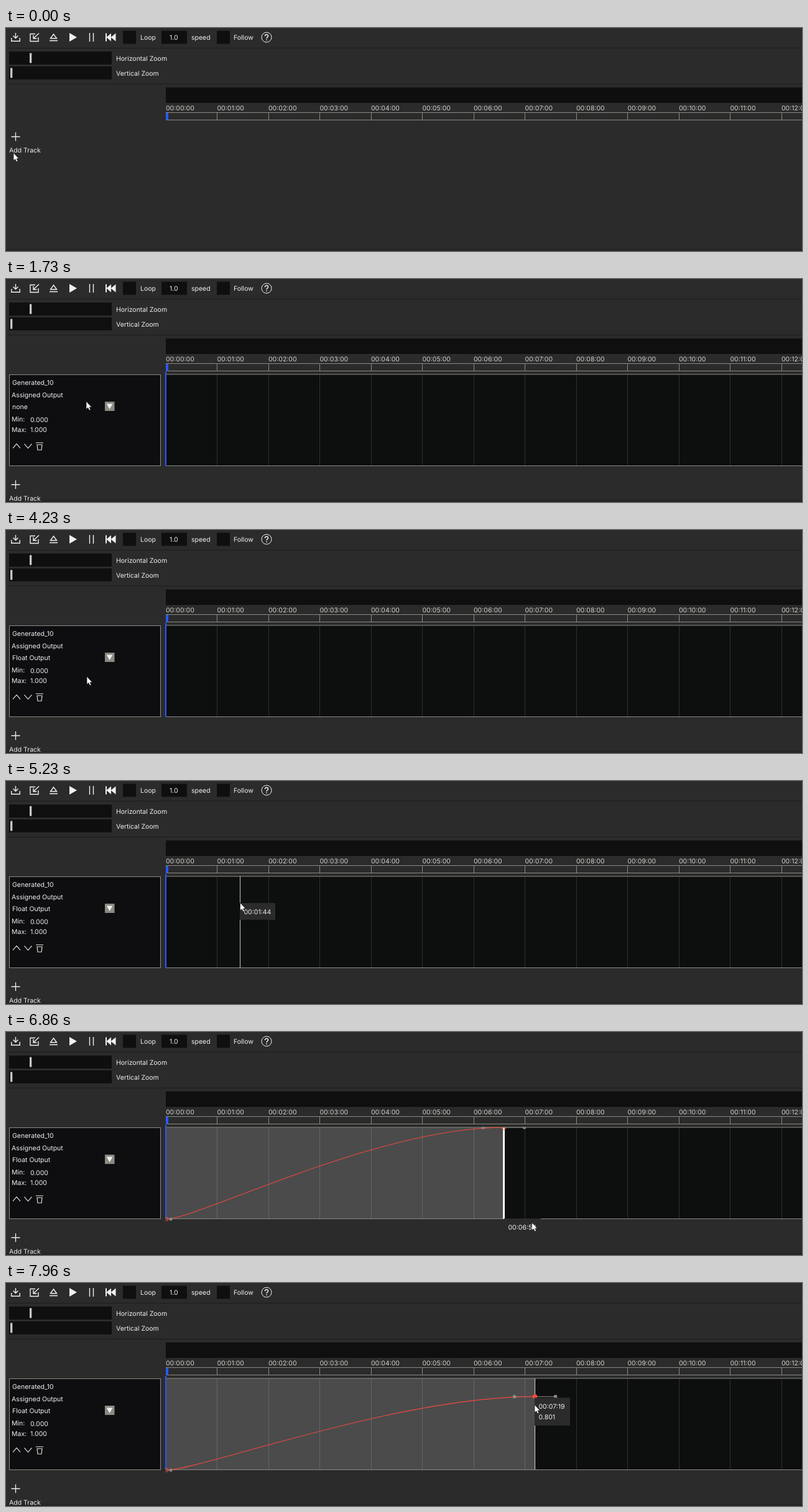
These frames come from a looping animation (1280 by 360 pixels, 8000 ms). An HTML page:

```html
<!DOCTYPE html>
<html lang="en">
<head>
<meta charset="utf-8">
<title>Sequence editor</title>
<style>
html, body { margin: 0; width: 100%; height: 100%; overflow: hidden; background: #2b2b2b; }
svg { display: block; width: 1280px; height: 360px; }
text { font: 10.5px Inter, "Open Sans", sans-serif; white-space: pre; text-rendering: geometricPrecision; }
</style>
</head>
<body>
<svg id="stage" viewBox="0 0 1280 360" xmlns="http://www.w3.org/2000/svg">
  <defs>
    <clipPath id="trackClip"><rect x="256" y="153.5" width="1024" height="160"/></clipPath>
  </defs>
  <g id="fixed"></g>
  <g id="scene"></g>
</svg>
<script>
const LOOP = 8000;
const BG = '#2b2b2b', DARK = '#0f0f0f', BLUE = '#2959ff', GREY = '#8b8a83', WHITE = '#f0f0ee', RED = '#f2483f';
const LEFT = 257, SECOND = 82.5, TOP = 154, BOTTOM = 301.5, WIDTH = 1023;

const rect = (x, y, w, h, fill, extra = '') =>
  `<rect x="${x}" y="${y}" width="${w}" height="${h}" fill="${fill}" ${extra}/>`;
const text = (x, cy, str, fill = WHITE) => `<text x="${x}" y="${cy + 3.8}" fill="${fill}">${str}</text>`;
const stroke = (d, color = WHITE, width = 1) =>
  `<path d="${d}" fill="none" stroke="${color}" stroke-width="${width}"/>`;
const shape = (d, fill = WHITE) => `<path d="${d}" fill="${fill}"/>`;
const dot = (x, y, r, fill) => `<circle cx="${x}" cy="${y}" r="${r}" fill="${fill}"/>`;
const ring = (x, y, r, color, fill = 'none') =>
  `<circle cx="${x}" cy="${y}" r="${r}" fill="${fill}" stroke="${color}"/>`;

// Cursor path: time, x, y
const path = [
  [0, 12, 202], [230, 16, 178], [700, 16, 178], [930, 129, 198],
  [2160, 129, 198], [2360, 97, 207], [2560, 150, 213], [2660, 171, 209],
  [2830, 171, 209], [3060, 167, 207], [3600, 166, 206], [4000, 134, 242],
  [4230, 130, 237], [4530, 130, 237], [4630, 221, 330], [4860, 310, 312],
  [5130, 387, 200], [5230, 376.5, 197], [5400, 376.5, 197], [5700, 531, 197],
  [6160, 392.5, 196.5], [6230, 392.5, 196.5], [6530, 377, 230], [6700, 377, 230],
  [6830, 800.5, 302], [6860, 845.5, 308], [6930, 876, 320], [7130, 850.6, 300],
  [7530, 850.6, 155], [7600, 850.6, 155], [7930, 850, 183.4], [7960, 850, 197]
];

function cursorAt(t) {
  const next = path.findIndex(k => k[0] >= t);
  const i = next < 0 ? path.length - 1 : Math.max(1, next);
  const [t0, x0, y0] = path[i - 1], [t1, x1, y1] = path[i];
  const u = Math.min(1, (t - t0) / (t1 - t0));
  return { x: x0 + (x1 - x0) * u, y: y0 + (y1 - y0) * u };
}

const inside = (c, x, y, w, h) => c.x >= x && c.x < x + w && c.y >= y && c.y < y + h;
const pad = n => String(n).padStart(2, '0');
const gridX = i => Math.floor(LEFT + i * SECOND) + 0.5;

function timeLabel(x) {
  const cs = Math.floor((x - LEFT) / SECOND * 100);
  return `00:${pad(Math.floor(cs / 100))}:${pad(cs % 100)}`;
}

function drawFixed() {
  let s = rect(0, 356, 1280, 4, '#262626');
  s += stroke('M3 32.5H1280M3 90.5H1280', '#1c1c1c');
  s += stroke('M15.5 8v8.5m-4-4l4 4l4-4M8.8 16v5.2h13.4v-5.2', WHITE, 1.4);
  s += stroke('M47 9.5h-8v12h13v-6.5M53 8.5l-9 8.5m0-5.5v5.5h5.5', WHITE, 1.4);
  s += stroke('M76.5 10l-5 6.8h10zM70 20.5h13', WHITE, 1.4);
  s += shape('M102 8l12 7l-12 7z');
  s += stroke('M134.5 8v14m6-14v14', WHITE, 1.4);
  s += shape('M160 8.5h2v13h-2zM169 8.5v13l-7.5-6.5zM176.5 8.5v13l-8-6.5z');
  for (const [x, w] of [[188, 21], [250, 41], [339, 21]]) s += rect(x, 4.5, w, 21, DARK);
  s += text(216, 15.5, 'Loop') + text(263, 15.5, '1.0') + text(298, 15.5, 'speed') + text(366, 15.5, 'Follow');
  s += ring(419, 15, 8, WHITE);
  s += stroke('M416.4 13.2c0-3.6 5.3-3.5 5.2-.3c-.1 1.8-2.6 1.8-2.6 4.1', WHITE, 1.4) + dot(419, 19.2, 0.9, WHITE);
  ['Horizontal', 'Vertical'].forEach((name, i) => {
    const y = 38 + 24 * i;
    s += rect(5, y, 165, 21, DARK) + rect(i ? 7 : 38, y + 2.5, 3.3, 16, '#c9c9c4');
    s += text(177, y + 11.3, name + ' Zoom');
  });
  s += rect(LEFT, 96, WIDTH, 25, DARK);
  s += stroke('M257 136.5H1280M257 148.5H1280', GREY);
  for (let i = 0; i < 13; i++)
    s += text(LEFT + i * SECOND, 129.3, `00:${pad(i)}:00`, '#d2d2cd') + stroke(`M${gridX(i)} 137v11`, GREY);
  return s + rect(LEFT, 137, 4, 11.5, BLUE);
}

function drawAdd(y, hover) {
  return (hover ? rect(5, y - 10.5, 21, 21, BLUE) : '') +
    stroke(`M8.5 ${y}h14m-7-7v14`, WHITE, 1.3) + text(5, y + 21.7, 'Add Track');
}

function drawMenu(c) {
  let s = rect(16.5, 178, 179.5, 153, '#2d2d2d');
  ['CurveFloat', 'Event', 'CurveVec2', 'CurveVec3', 'Audio'].forEach((name, i) => {
    const y = 184 + 24 * i, w = name.startsWith('Curve') ? 166 : 140;
    s += rect(23, y, w, 21, inside(c, 23, y, w, 21) ? BLUE : GREY);
    s += text(26.5, y + 11.2, 'nap::SequenceTrack' + name);
  });
  return s + stroke('M27.5 307.5l13 13m0-13l-13 13', WHITE, 1.3);
}

function drawPanel(t, c) {
  const hover = inside(c, 158, 197, 17, 17);
  let s = rect(5.5, 154.5, 243, 147, '#0e0e11', `stroke="${GREY}"`);
  s += text(10, 167, 'Generated_10') + text(9, 186.7, 'Assigned Output');
  s += text(10, 206.5, t < 4230 ? 'none' : 'Float Output');
  s += rect(159, 198, 15.5, 15, hover ? BLUE : GREY) + shape('M161.8 201.5h9.6l-4.8 8.5z');
  s += text(9, 226.5, 'Min:') + text(39, 227, '0.000') + text(9, 243, 'Max:') + text(39, 243.5, '1.000');
  return s + stroke('M11 273.2l6-7l6 7M29.5 266.2l6 7l6-7M48 264.5h12M50 267.5l1 8.5h6l1-8.5z', '#deded8', 1.2);
}

function drawList(c) {
  let s = rect(9, 215, 166, 45, '#2d2d2d');
  ['none', 'Float Output'].forEach((name, i) => {
    const y = 219.5 + 17.5 * i;
    const fill = inside(c, 9, y, 166, 17.5) ? BLUE : i ? '' : GREY;
    if (fill) s += rect(13, y, 158, 17, fill);
    s += text(17, y + 8.7, name);
  });
  return s;
}

const tip = (x, y, w, lines) => rect(x, y, w, lines.length > 1 ? 45 : 27, BG) +
  lines.map((line, i) => text(x + 6.5, y + 13.7 + 17.5 * i, line)).join('');

function drawSegment(end, y, onEnd, onPoint) {
  const w = end - LEFT, low = BOTTOM + 0.5;
  const s = stroke(`M${end} ${TOP}V${BOTTOM}`, onEnd ? '#fff' : '#d8d8d4', onEnd ? 3 : 1) +
    stroke(`M${end - 33} ${y}h66M${LEFT} ${low}h8`, GREY) +
    stroke(`M${LEFT} ${low}C${LEFT + w * 0.096} ${low} ${LEFT + w * 0.622} ${y} ${end} ${y}`, RED, 1.1) +
    dot(end - 33, y, 2.8, GREY) + dot(end + 33, y, 2.8, GREY) + dot(265, low, 2.6, GREY) +
    ring(258, low, 3, RED) + ring(end, y, 3.5, RED, onPoint ? RED : 'none');
  return `<g clip-path="url(#trackClip)">${s}</g>`;
}

function drawTrack(t, c, last) {
  const hasSegment = t >= 5400;
  const dragEnd = t >= 6730 && t < 7130, dragPoint = t >= 7630;
  const end = t < 6730 ? 376.5 : dragEnd ? Math.max(376.5, last.x) : 850.6;
  const y = dragPoint ? Math.max(TOP, last.y) : TOP;
  const over = inside(c, LEFT, 153, WIDTH, 149);
  const onPoint = dragPoint || (t >= 7130 && Math.abs(c.y - y) < 6);
  const onEnd = dragEnd || (hasSegment && over && !onPoint && Math.abs(c.x - end) < 5);
  let s = rect(LEFT, TOP, WIDTH, BOTTOM - TOP, '#0d0e0e'), tips = '';

  for (let i = 1; i < 13; i++) s += stroke(`M${gridX(i)} 154v147`, '#2f2f2f');
  if (hasSegment && (dragEnd || dragPoint || (over && c.x < end + 5)))
    s += rect(LEFT, TOP, end - LEFT, BOTTOM - TOP, '#fff', 'fill-opacity=".255"');
  s += stroke(`M${LEFT} ${TOP}H1280M${LEFT} ${BOTTOM}H1280`, GREY);
  s += stroke(`M${LEFT} 150v152`, BLUE, 2);
  if (hasSegment) s += drawSegment(end, y, onEnd, onPoint);

  if (dragEnd) tips = tip(end + 0.5, 301, 59, [timeLabel(end)]);
  else if (onPoint) tips = tip(end - 0.6, y + 1.7, 57, [timeLabel(end), ((302 - y) / 148).toFixed(3)]);
  else if (over && !onEnd) {
    const x = Math.floor(c.x);
    s += stroke(`M${x + 0.5} ${TOP}V${BOTTOM}`, '#c8c8c4');
    tips = tip(x, Math.floor(c.y), 57, [timeLabel(c.x)]);
  }
  return s + tips;
}

function draw(t, previous) {
  const c = cursorAt(t), last = cursorAt(previous);
  const menu = t >= 330 && t < 1660, track = t >= 1730, away = t >= 4660 && t < 4860;
  let s = drawAdd(track ? 332 : 175.5, !menu && !track && inside(c, 5, 165, 21, 21));
  if (menu) s += drawMenu(c);
  if (track) s += drawPanel(t, c) + drawTrack(t, c, last);
  if (t >= 2930 && t < 4230) s += drawList(c);
  if (!away) s += `<path transform="translate(${c.x} ${c.y})" d="M0-.5v12.7l2.8-2.5l2 4.3l2.2-1l-1.9-4.1h3.7z" fill="#fff" stroke="#111" stroke-width=".7"/>`;
  return s;
}

// The screen refreshes 30 times a second, on whole hundredths
const stepTime = n => Math.max(0, Math.floor(n * 10 / 3) * 10);
const scene = document.getElementById('scene');
document.getElementById('fixed').innerHTML = drawFixed();
let shown = -1;

function tick() {
  const step = Math.floor((performance.now() % LOOP + 7) * 3 / 100) % (LOOP * 3 / 100);
  if (step !== shown) {
    shown = step;
    scene.innerHTML = draw(stepTime(step), Math.min(7930, stepTime(step - 1)));
  }
  requestAnimationFrame(tick);
}
tick();
</script>
</body>
</html>
```
